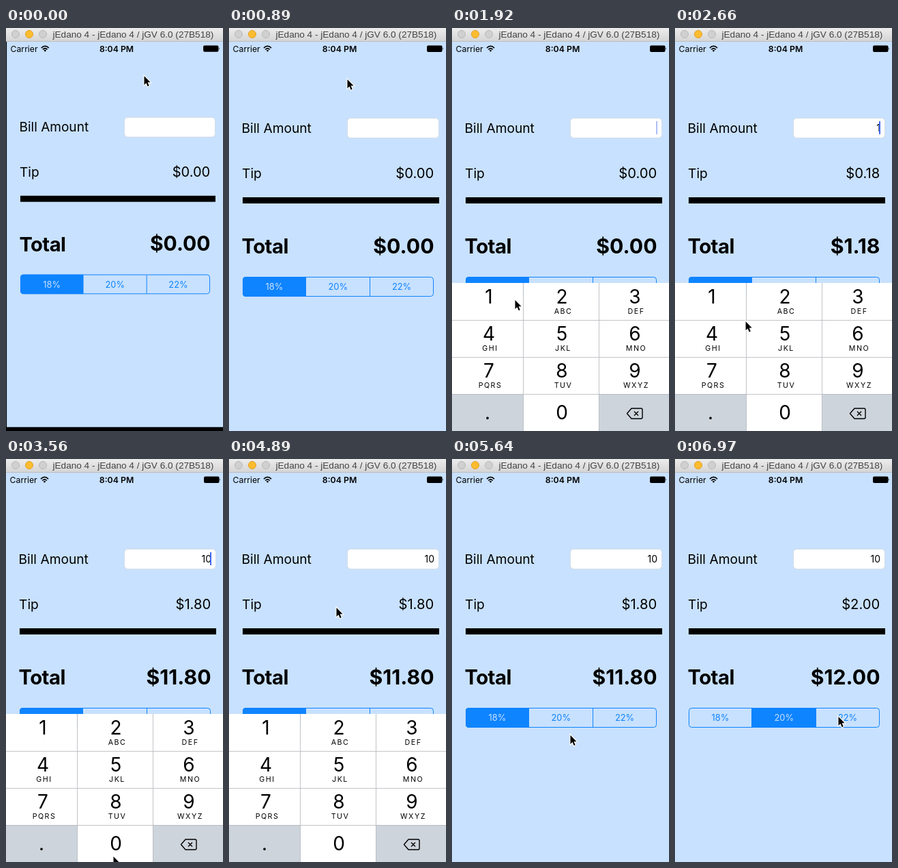
Recreate the animation shown at these times as an HTML page. Size 318 by 588 pixels, loop 8000 ms.

```html
<!DOCTYPE html>
<html lang="en">
<head>
<meta charset="utf-8">
<title>Tip calculator</title>
<style>
html, body { margin: 0; width: 100%; height: 100%; overflow: hidden; background: #000; }
svg { display: block; width: 318px; height: 588px; font-family: Inter, "Noto Sans", sans-serif; }
.label { font-size: 19.2px; }
.sum { font-size: 20.2px; text-anchor: end; }
.total { font-size: 29.3px; font-weight: 700; letter-spacing: -.5px; }
.grand { font-size: 30.2px; font-weight: 700; text-anchor: end; }
.status { font-size: 12.3px; }
.entry { font-size: 14px; text-anchor: end; }
.seg { font-size: 12.9px; text-anchor: middle; }
.digit { font-size: 28px; text-anchor: middle; }
.letters { font-size: 10.7px; letter-spacing: 1.5px; text-anchor: middle; }
.title { font: 13.6px "Liberation Sans", sans-serif; fill: #444; }
</style>
</head>
<body>
<svg viewBox="0 0 318 588">
  <defs>
    <linearGradient id="chrome" x2="0" y2="1">
      <stop offset="0" stop-color="#ececec"/>
      <stop offset="1" stop-color="#d4d4d4"/>
    </linearGradient>
    <clipPath id="rounded"><rect x="20" y="363" width="280" height="29" rx="4.5"/></clipPath>
  </defs>
  <rect width="318" height="588"/>

  <g id="phone">
    <rect y="20" width="320" height="568" fill="#c8e1fe"/>
    <text class="status" x="5.5" y="34.7">Carrier</text>
    <path d="M51 29.2Q56.5 23.7 62 29.2M53.2 31.5Q56.5 28.2 59.8 31.5" fill="none" stroke="#000" stroke-width="1.7"/>
    <path d="M54.6 32.7Q56.5 31.2 58.4 32.7L56.5 34.8Z"/>
    <text class="status" x="162" y="34.7" font-weight="600" text-anchor="middle">8:04 PM</text>
    <rect x="290" y="25.5" width="22.5" height="9.5" rx="2"/>
    <path d="M313.3 28.6q1.6 1.6 0 3.2z"/>

    <text class="label" x="18.5" y="152.5">Bill Amount</text>
    <rect x="173.5" y="131.5" width="134" height="29" rx="5" fill="#fff" stroke="#d3dbe5"/>
    <text class="entry" id="entry" x="301" y="150.5"></text>
    <rect id="caret" x="299" y="136" width="2" height="19" fill="#426bf2"/>

    <text class="label" x="19" y="218.7">Tip</text>
    <text class="sum" id="tip" x="300.2" y="218.7"></text>
    <rect x="20" y="247" width="288" height="9"/>
    <text class="total" x="18.4" y="329.2">Total</text>
    <text class="grand" id="total" x="300.5" y="328.5"></text>

    <rect id="chosen" y="363" width="94" height="29" fill="#0f84ff" clip-path="url(#rounded)"/>
    <g fill="none" stroke="#0f84ff">
      <rect x="20.5" y="363.5" width="279" height="28" rx="4"/>
      <path d="M112.5 364v27M206.5 364v27"/>
    </g>
    <g id="segments"></g>
    <g id="keypad"></g>
  </g>

  <rect width="318" height="20" fill="url(#chrome)"/>
  <path d="M0 19.5H318" stroke="#bdbdbd"/>
  <g stroke="#b8b8b8" fill="#d0d0d0">
    <circle cx="14" cy="9" r="5.5"/>
    <circle cx="34" cy="9" r="5.5" fill="#fdbc2f" stroke="#dfa023"/>
    <circle cx="54" cy="9" r="5.5"/>
  </g>
  <text class="title" x="68.5" y="14">jEdano 4 - jEdano 4 / jGV 6.0 (27B518)</text>

  <path id="pointer" d="M.5 1V14L3.500 11.200L5.700 16.200L7.700 15.300L5.600 10.300H9.600Z"
        stroke="#fff" stroke-width="2.2" paint-order="stroke"/>
</svg>

<script>
const LOOP = 8000, STEP = 148.2;
const RATES = [18, 20, 22];
const GREY = '#ced4dc';
const $ = id => document.getElementById(id);

function add(parent, tag, attrs, text = '') {
  const el = document.createElementNS('http://www.w3.org/2000/svg', tag);
  for (const name in attrs) el.setAttribute(name, attrs[name]);
  el.textContent = text;
  return parent.appendChild(el);
}

const segments = RATES.map((rate, i) =>
  add($('segments'), 'text', { class: 'seg', x: 66.5 + i * 93.3, y: 382.2 }, rate + '%'));

const pad = $('keypad');
const edges = [0, 104.5, 215.5, 320];
const letters = ' ABC DEF GHI JKL MNO PQRS TUV WXYZ'.split(' ');
const keys = [...'123456789.0<'].map((name, i) => {
  const col = i % 3, y = 372 + Math.floor(i / 3) * 54, center = 54 + col * 108;
  const key = add(pad, 'rect', {
    x: edges[col], y, width: edges[col + 1] - edges[col], height: 54,
    fill: '.<'.includes(name) ? GREY : '#fff'
  });
  const x = center - col;
  if (name === '<') {
    add(pad, 'path', {
      d: 'M256.5 562.5L263 555H277Q279 555 279 557V568Q279 570 277 570H263ZM267 559.5l6 6m0-6l-6 6',
      fill: 'none', stroke: '#000', 'stroke-width': 1.4, 'stroke-linejoin': 'round'
    });
  } else {
    add(pad, 'text', { class: 'digit', x: name === '.' ? x - 2 : x, y: y + (i > 8 ? 37 : 30) }, name);
    if (letters[i]) add(pad, 'text', { class: 'letters', x: x + 2, y: y + 45 }, letters[i]);
  }
  return key;
});
add(pad, 'path', {
  d: 'M0 426.5H320M0 480.5H320M0 534.5H320M104.5 372V588M215.5 372V588',
  stroke: '#b4b7bb', 'stroke-width': .8
});

const clamp = v => Math.min(1, Math.max(0, v));
const progress = (t, start, length) => clamp((t - start) / length);
const smooth = p => p * p * (3 - 2 * p);
const easeOut = p => 1 - (1 - p) ** 3;
const money = value => '$' + value.toFixed(2);

// Pointer moves: start, duration, destination
const moves = [
  [450, 290, 111, 6],
  [740, 300, 236, 143],
  [1040, 440, 228, 170],
  [1480, 440, 92, 396],
  [2510, 600, 157, 579],
  [3860, 440, 157, 216],
  [5040, 600, 173, 402],
  [5640, 290, 165, 375],
  [6230, 740, 239, 375]
];

function pointerAt(t) {
  let x = 202, y = 69;
  for (const [start, length, toX, toY] of moves) {
    const p = smooth(progress(t, start, length));
    x += (toX - x) * p;
    y += (toY - y) * p;
  }
  return [x, y];
}

function caretAt(t) {
  const focused = t >= 1030 && t < 4880;
  return focused ? clamp(.5 + 1.5 * Math.cos((t - 1670) / 1000 * 2 * Math.PI)) : 0;
}

function draw(now) {
  const t = Math.floor(now % LOOP / STEP + .06) * STEP;
  const bill = t < 2500 ? '' : t < 3550 ? '1' : '10';
  const choice = t < 6220 ? 0 : 1;
  const tip = bill * RATES[choice] / 100;
  const raised = easeOut(progress(t, 1245, 600)) - easeOut(progress(t, 4960, 600));

  $('phone').setAttribute('transform', t < 100 ? 'translate(160 20) scale(.993 .99) translate(-160 -20)' : '');
  $('pointer').setAttribute('transform', `translate(${pointerAt(t)})`);
  $('caret').setAttribute('opacity', caretAt(t));
  pad.setAttribute('transform', `translate(0 ${230 * (1 - raised)})`);
  $('entry').textContent = bill;
  $('tip').textContent = money(tip);
  $('total').textContent = money(+bill + tip);
  $('chosen').setAttribute('x', choice ? 113 : 19);
  segments.forEach((el, i) => el.setAttribute('fill', i === choice ? '#c8e1fe' : '#0f84ff'));
  keys[0].setAttribute('fill', t > 2200 && t < 2500 ? GREY : '#fff');
  keys[10].setAttribute('fill', t > 3100 && t < 3250 ? GREY : '#fff');
}

let start;
function tick(now) {
  start ??= now;
  draw(now - start);
  requestAnimationFrame(tick);
}
draw(0);
requestAnimationFrame(tick);
</script>
</body>
</html>
```
